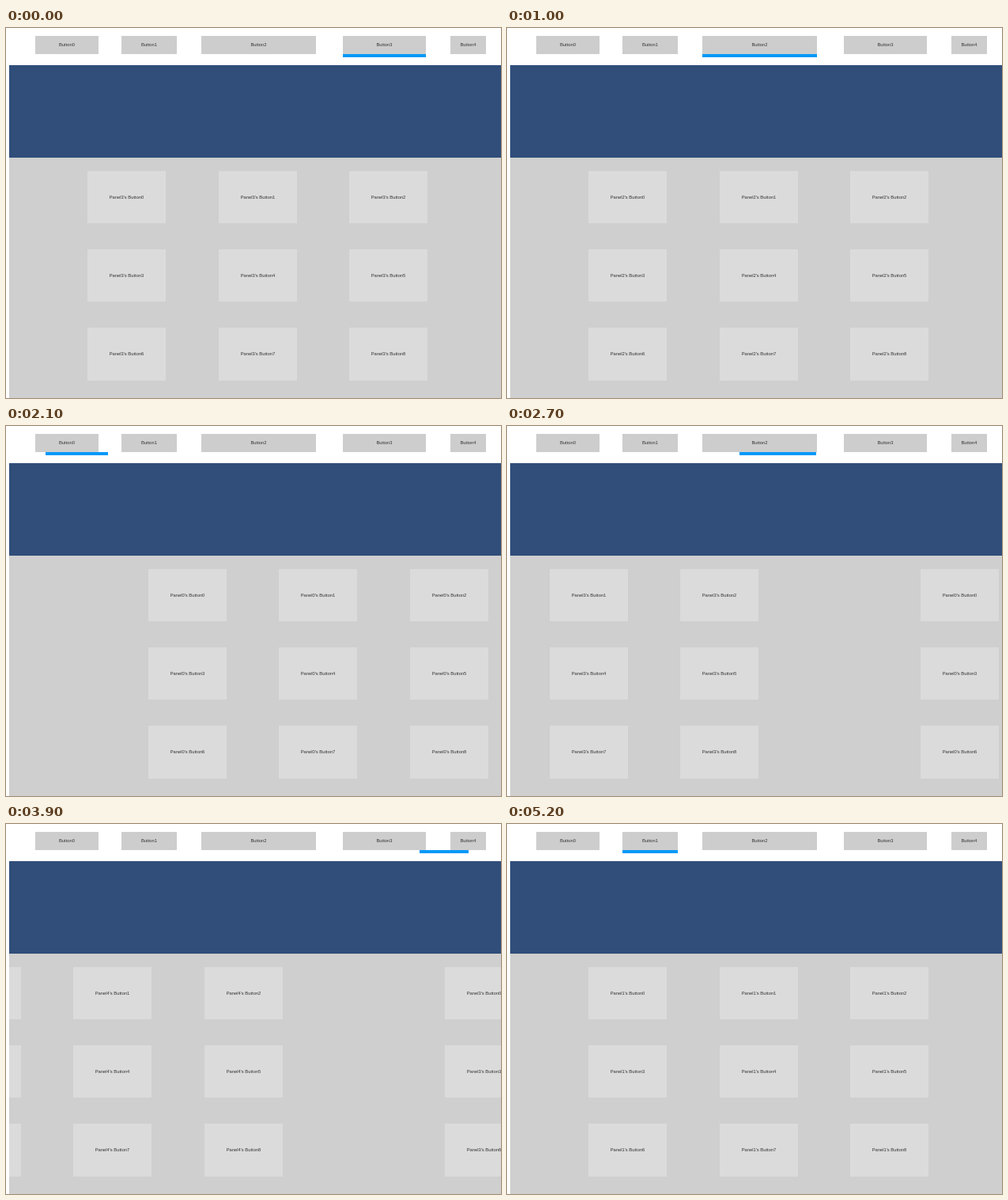
Write an HTML page with a canvas that moves like this. It is 626 px wide and 468 px high and loops after 5.8 s.

```html
<!DOCTYPE html>
<html lang="en">
<head>
<meta charset="utf-8">
<title>Sliding panels</title>
<style>
html, body { margin: 0; width: 100%; height: 100%; overflow: hidden; background: #fff; }
canvas { display: block; }
</style>
</head>
<body>
<canvas width="626" height="468"></canvas>
<script>
const ctx = document.querySelector('canvas').getContext('2d');
const LOOP = 5800, TICK = 100, LEAD = 15, SLIDE = 435, PITCH = 635;
const tabs = [[37, 80], [146, 70], [247, 145], [426, 105], [562, 45]]; // left, width
const rows = [[181, 66], [280, 66], [379, 67]]; // top, height
const slides = [ // start time, panel to show
  [-SLIDE, 3], [438, 2], [1222, 1], [1816, 0], [2518, 3], [3221, 4], [3832, 3], [4686, 1]
];
slides[1][0] = 486;

const easeOut = t => 1 - (1 - t) ** 2;
const mix = (a, b, p) => a + (b - a) * p;

function rect(color, x, y, w, h) {
  ctx.fillStyle = color;
  ctx.fillRect(x, y, w, h);
}

function button(label, color, x, y, w, h) {
  rect(color, x, y, w, h);
  ctx.fillStyle = '#333';
  ctx.fillText(label, x + w / 2, Math.round(y + h / 2 + 1.8));
}

function panel(id, offset) {
  rows.forEach(([y, h], r) => {
    for (let c = 0; c < 3; c++) {
      const x = Math.round(103 + 165.5 * c + offset);
      button(`Panel${id}'s Button${r * 3 + c}`, '#dbdbdb', x, y, 99, h);
    }
  });
}

function draw(time) {
  let i = slides.length - 1;
  while (slides[i][0] > time) i--;
  const [start, to] = slides[i];
  const from = i ? slides[i - 1][1] : to;
  const p = easeOut(Math.min(1, (time - start) / SLIDE));

  rect('#fff', 0, 0, 626, 468);
  tabs.forEach(([x, w], n) => button('Button' + n, '#cdcdcd', x, 10, w, 23));
  const [barX, barW] = [0, 1].map(k => Math.round(mix(tabs[from][k], tabs[to][k], p)));
  rect('#0499f8', barX, 33, barW, 4);

  rect('#304e79', 4, 47, 622, 117);
  ctx.save();
  ctx.beginPath();
  ctx.rect(4, 164, 622, 304);
  ctx.clip();
  rect('#cfcfcf', 4, 164, 622, 304);
  // Higher panels enter from the left, lower ones from the right.
  const dir = to > from ? PITCH : -PITCH;
  if (p < 1) panel(from, dir * p);
  panel(to, dir * (p - 1));
  ctx.restore();
}

ctx.font = '5.8px "Liberation Sans", Arial, sans-serif';
ctx.textAlign = 'center';

// The picture advances in steps of one tick.
function frame() {
  const now = (performance.now() + LEAD) % LOOP;
  draw(Math.floor(now / TICK) * TICK);
  requestAnimationFrame(frame);
}
frame();
</script>
</body>
</html>
```
